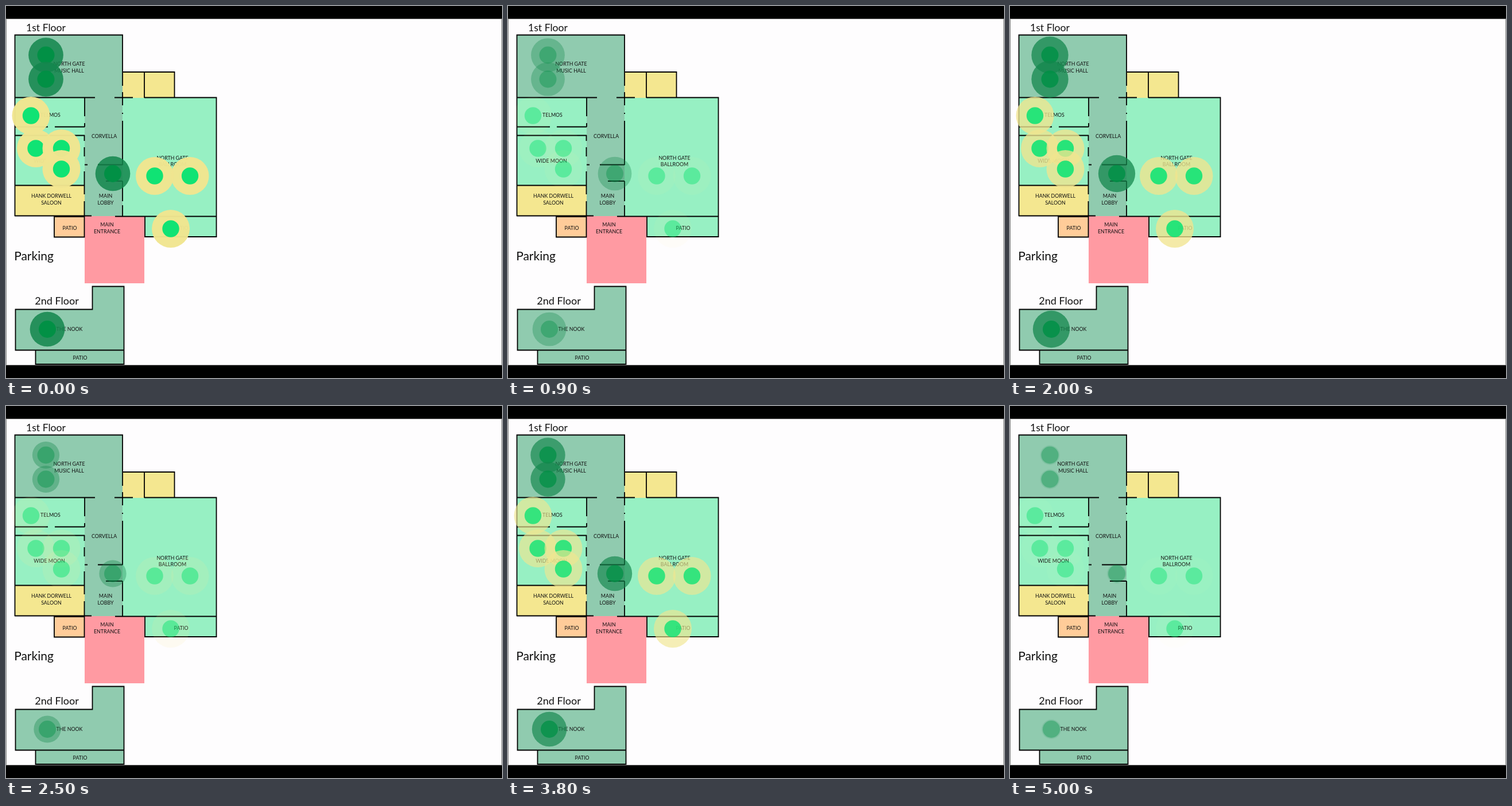
These frames come from a looping animation (864 by 648 pixels, 5100 ms). An HTML page with a canvas:

```html
<!DOCTYPE html>
<html lang="en">
<head>
<meta charset="utf-8">
<title>Venue floor plan</title>
<style>
  html, body { margin: 0; width: 100%; height: 100%; overflow: hidden; background: #000; }
  canvas { display: block; }
</style>
</head>
<body>
<canvas id="stage" width="864" height="648"></canvas>
<script>
const ctx = document.getElementById('stage').getContext('2d');

const LOOP = 5100, STEP = 100;
const FADE_PERIOD = 1700, FADE_TIME = 1000;
const GROW_PERIOD = 952, GROW_START = 140;

const MINT = '#97f0c3', SAGE = '#90cbaf', KHAKI = '#f4e790';

const rooms = [
  [SAGE, 15, 50, 188, 110],
  [KHAKI, 203, 115, 90, 45],
  [MINT, 15, 160, 122, 153],
  [SAGE, 137, 159, 66, 207],
  [MINT, 203, 160, 163, 242],
  [KHAKI, 15, 313, 122, 52],
  ['#ffcc99', 84, 367, 53, 35],
  ['#fefdfe', 203, 367, 39, 36],
  ['#ff9aa2', 137, 366, 104, 117],
  [SAGE, 16, 528, 190, 71],
  [SAGE, 150, 488, 56, 41],
  [SAGE, 51, 599, 155, 25]
];

const walls = `
  M15.5 366V50.5H203V139 M203 150V173 M203 186V188 M203 200V277 M203 305V340 M203 347V366
  M204 115H293.5V160 M241 115V160 M15 159.5H155 M189 159.5H221 M241 159.5H366.5V402H242V366
  M137 160V192 M137 204V210.5 M15 210.5H73 M85 210.5H137 M15 225.5H137
  M136.5 225V235 M136.5 246V262 M136.5 288V328 M136.5 340V366
  M15 312.5H137 M15 365.5H149 M190 366.5H366
  M137 276.5H142 M160 276.5H203 M174 305H203
  M84 367H136.5V402.5H84Z
  M16.5 528.5H150.5V488.5H205.5V624H51.5V599.5H16.5Z M51 599.5H205`;

const labels = [
  ['NORTH GATE', 110, 104], ['MUSIC HALL', 110, 116],
  ['TELMOS', 77.5, 192.5], ['CORVELLA', 171, 229.5], ['WIDE MOON', 75.5, 272.5],
  ['NORTH GATE', 290, 267.5], ['BALLROOM', 290, 279],
  ['HANK DORWELL', 79, 334], ['SALOON', 79, 345.5],
  ['MAIN', 173.5, 334], ['LOBBY', 173.5, 345.5],
  ['MAIN', 176, 384], ['ENTRANCE', 176, 396],
  ['PATIO', 111, 389.5], ['PATIO', 305, 389.5],
  ['THE NOOK', 110.5, 566], ['PATIO', 129, 616]
];

const headings = [['1st Floor', 69.5, 43.5, 17.6], ['2nd Floor', 88.5, 519.5, 18], ['Parking', 48.5, 442.5, 21]];

const growing = [[69.5, 85.5], [69.5, 127.5], [186, 292], [72, 563]];
const fading = [[43.5, 191], [52, 248], [96.5, 248], [96.5, 284], [259, 296], [320.5, 296], [287, 388]];

function text(str, x, y, size) {
  ctx.font = `${size}px Lato, "Open Sans", sans-serif`;
  ctx.fillText(str, x, y);
}

function disc([x, y], r, color, alpha) {
  ctx.globalAlpha = alpha;
  ctx.fillStyle = color;
  ctx.beginPath();
  ctx.arc(x, y, r, 0, 2 * Math.PI);
  ctx.fill();
  ctx.globalAlpha = 1;
}

function drawPlan() {
  ctx.fillStyle = '#000';
  ctx.fillRect(0, 0, 864, 648);
  ctx.fillStyle = '#fefdfe';
  ctx.fillRect(0, 22, 864, 604);
  ctx.lineWidth = 1;
  ctx.strokeStyle = '#888';
  ctx.strokeRect(0.5, 22.5, 863, 603);

  for (const [color, ...box] of rooms) {
    ctx.fillStyle = color;
    ctx.fillRect(...box);
  }
  ctx.lineWidth = 1.8;
  ctx.strokeStyle = '#000';
  ctx.stroke(new Path2D(walls));

  ctx.fillStyle = '#111';
  ctx.textAlign = 'center';
  for (const [str, x, y] of labels) text(str, x, y, 8.8);
  for (const heading of headings) text(...heading);
}

function drawMarkers(t) {
  const fade = (1 + Math.cos(Math.PI * Math.min(1, t % FADE_PERIOD / FADE_TIME))) / 2;
  const grow = (t - GROW_START + GROW_PERIOD) % GROW_PERIOD / GROW_PERIOD;

  for (const spot of growing) {
    disc(spot, 15 + 18 * grow, '#13874d', (0.32 + 0.53 * fade) * Math.min(1, 4 * grow));
    disc(spot, 15, '#009045', 0.36 + 0.6 * fade);
  }
  for (const spot of fading) {
    disc(spot, 33, '#f1e690', 0.03 + 0.94 * fade);
    disc(spot, 14.7, '#10e374', 0.45 + 0.55 * fade);
  }
}

function frame(now) {
  drawPlan();
  drawMarkers(Math.floor(now % LOOP / STEP) * STEP);
  requestAnimationFrame(frame);
}
requestAnimationFrame(frame);
</script>
</body>
</html>
```
